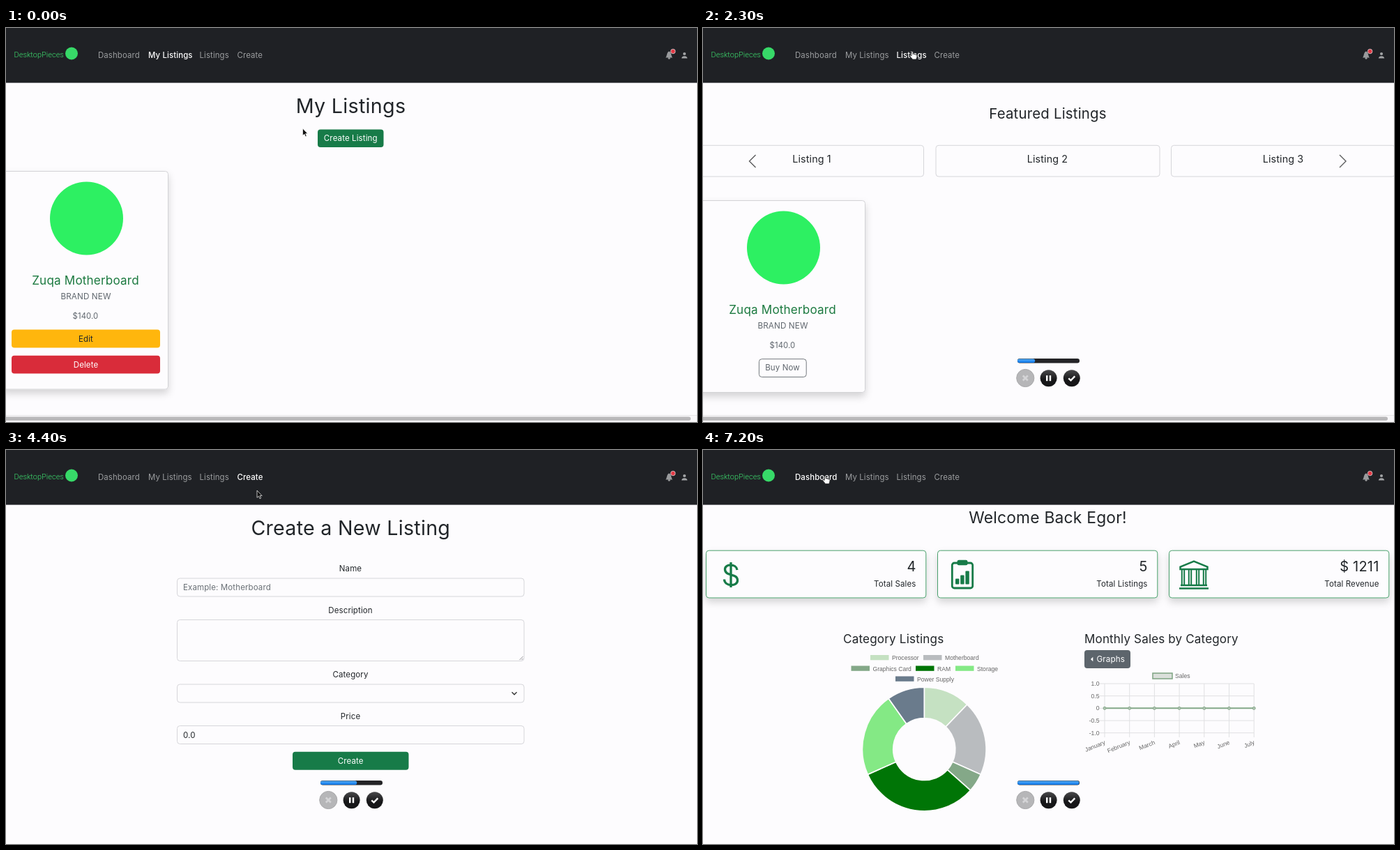
Write an HTML page that moves like this. It is 991 by 565 pixels and loops after 7300 ms.

```html
<!DOCTYPE html>
<html lang="en">
<head>
<meta charset="utf-8">
<title>Parts shop</title>
<style>
html, body { margin: 0; width: 100%; height: 100%; overflow: hidden; background: #fdfcfe; }
svg { display: block; width: 991px; height: 565px; }
text { font-family: Inter, sans-serif; font-optical-sizing: none; letter-spacing: .01em; fill: #212529; white-space: pre; }
text.chart { font-family: "Liberation Sans", sans-serif; letter-spacing: 0; fill: #666; }
text.brand { font-family: Roboto, sans-serif; font-weight: 300; letter-spacing: 0; }
</style>
</head>
<body>
<svg id="stage" viewBox="0 0 991 565" xmlns="http://www.w3.org/2000/svg"></svg>
<script>
const LOOP = 7300, STEP = 100;
const GREEN = '#177b48', INK = '#212529', GREY = '#5f666d', BG = '#fdfcfe';
const stage = document.getElementById('stage');
const el = id => document.getElementById(id);

const rect = (x, y, w, h, fill, extra = '') =>
  `<rect x="${x}" y="${y}" width="${w}" height="${h}" fill="${fill}" ${extra}/>`;
const circle = (x, y, r, fill, extra = '') =>
  `<circle cx="${x}" cy="${y}" r="${r}" fill="${fill}" ${extra}/>`;
const line = (d, color, width, extra = '') =>
  `<path d="${d}" fill="none" stroke="${color}" stroke-width="${width}" ${extra}/>`;
const text = (s, x, y, size, anchor = 'start', fill = INK, extra = '') =>
  `<text x="${x}" y="${y}" font-size="${size}" text-anchor="${anchor}" style="fill:${fill}" ${extra}>${s}</text>`;
const mid = (s, x, y, size, fill) => text(s, x, y, size, 'middle', fill);
const small = (s, x, y, anchor, extra = '') => text(s, x, y, 8.6, anchor, '#666', 'class="chart" ' + extra);
const group = (id, body) => `<g id="${id}">${body}</g>`;
const button = (s, x, y, w, h, fill, ink = '#fff') =>
  rect(x, y, w, h, fill, 'rx="4"') + mid(s, x + w / 2, y + h / 2 + 4, 11.5, ink);
const frame = (x, y, w, h, color = '#d6d6da', extra = '') =>
  rect(x, y, w, h, BG, `rx="4" stroke="${color}" ${extra}`);

// Navigation bar
const links = [['Dashboard', 132, 61], ['My Listings', 204, 62], ['Listings', 277.5, 43], ['Create', 331.5, 36]];
const nav = rect(0, 0, 991, 78.6, '#1f2125')
  + text('DesktopPieces', 11.5, 42, 11, 'start', '#3ee070', 'class="brand"')
  + circle(94, 36.5, 9, '#37d968')
  + links.map(([s, x], i) => text(s, x, 42.5, 11.4, 'start', '#9b9d9f', `id="link${i}"`)).join('')
  + '<path d="M946 42.5C948 41 947.5 34 951 33.5C954.5 34 954 41 956 42.5Z" fill="#999b9d"/>'
  + circle(951, 43.2, 1.5, '#999b9d')
  + circle(956.6, 33.5, 3.3, '#e33a45', 'stroke="#d9d9db" stroke-width=".8"')
  + circle(973, 37, 2.1, '#a2a4a6')
  + '<path d="M968.8 43.5C969 39 977 39 977.2 43.5Z" fill="#a2a4a6"/>';

// Product card shared by both listing pages
const card = (y, h, actions) =>
  frame(-5, y, 237.5, h, '#d3d3d6', 'filter="url(#shade)"')
  + circle(115.5, y + 67.5, 52.5, '#2df062')
  + mid('Zuqa Motherboard', 114, y + 162, 17.1, '#1c7a40')
  + mid('BRAND NEW', 114.5, y + 183.5, 11.7, GREY)
  + mid('$140.0', 114, y + 211, 11.3, GREY)
  + actions;

const mine = mid('My Listings', 494.5, 122, 28.7)
  + button('Create Listing', 447, 145.5, 94.5, 25.5, GREEN)
  + card(205.5, 312.5, button('Edit', 8, 432.5, 213, 26, '#ffb60d', INK)
    + button('Delete', 8, 469.8, 213, 25.7, '#d92c3a'));

const listings = mid('Featured Listings', 494.5, 130, 20.4)
  + [-4.5, 334, 671.5].map((x, i) => frame(x, 168.3, 321, 44.7)
    + mid('Listing ' + (i + 1), 156 + 338 * i, 193, 14.3)).join('')
  + line('M75.5 182L66.5 191L75.5 200M913 182L922 191L913 200', '#5b5b5d', 1.4)
  + card(247.5, 275, frame(80.4, 474.7, 67.8, 25.8, '#74797e') + mid('Buy Now', 114, 491, 11.5, GREY));

// Form page
const field = (label, y, h, value = '', color = INK) =>
  mid(label, 494, y - 10, 11.5) + frame(245.5, y, 497.5, h) + text(value, 254, y + 17, 11.5, 'start', color);
const form = mid('Create a New Listing', 494.3, 122, 28.6)
  + field('Name', 184, 26, 'Example: Motherboard', '#6a7076')
  + field('Description', 243.5, 59)
  + field('Category', 336, 26)
  + field('Price', 395.5, 26, '0.0')
  + line('M736.5 301L741.5 296M739.5 301L741.5 299', '#77777a', .8)
  + line('M725.5 347.2L729 350.7L732.5 347.2', '#333', 1.4)
  + button('Create', 411, 432.7, 166.5, 26, GREEN);

// Dashboard
const stats = [['4', 'Total Sales'], ['5', 'Total Listings'], ['$ 1211', 'Total Revenue']];
const tile = ([n, label], i) => {
  const x = 4.5 + 332 * i;
  return frame(x, 144.2, 315.3, 67.8, '#4aa06c', 'filter="url(#shade)"')
    + text(n, x + 301, 174, 20, 'end') + text(label, x + 301, 195.8, 11.5, 'end');
};
const icons = line('M49 172C48 163 31.5 162.5 31.5 171C31.5 182 49.5 176 49.5 187C49.5 196 31 196 30.5 185.5M40 161V197', GREEN, 3.3)
  + rect(357.3, 162, 29.4, 36, 'none', `rx="3" stroke="${GREEN}" stroke-width="2.8"`)
  + rect(364.5, 157.8, 15, 7.5, GREEN, 'rx="2.5"')
  + [8, 13, 19].map((h, i) => rect(362 + 7.2 * i, 192.5 - h, 5.4, h, GREEN, 'rx="1"')).join('')
  + line('M684.5 171V167.5L704 159.5L723.5 167.5V171Z', GREEN, 2.5)
  + [688.5, 698.5, 709.5, 719.5].map(x => line(`M${x - 1.7} 172V193M${x + 1.7} 172V193`, GREEN, 2)).join('')
  + line('M685 194H723M683 198.5H725', GREEN, 2.6);

// name, value, colour, legend position
const parts = [
  ['Processor', 5, '#c5e1c2', 240, 294],
  ['Motherboard', 8, '#b9bcbf', 316, 294],
  ['Graphics Card', 2, '#84a888', 212.5, 309.5],
  ['RAM', 13, '#007506', 305, 309.5],
  ['Storage', 9, '#84e985', 362, 309.5],
  ['Power Supply', 4, '#6a7b8c', 276, 324.5]
];
const total = parts.reduce((sum, p) => sum + p[1], 0);
const legend = parts.map(([s, , color, x, y]) =>
  rect(x, y, 26.5, 7.3, color) + small(s, x + 31, y + 7)).join('');

const months = ['January', 'February', 'March', 'April', 'May', 'June', 'July'];
const monthX = i => 576 + 35.7 * i;
const levelY = i => 335 + 17.67 * i;
const sales = rect(645, 320, 28, 8, '#dadfda', 'stroke="#84a888" stroke-width="1.6"')
  + small('Sales', 677, 327)
  + ['1.0', '0.5', '0', '-0.5', '-1.0'].map((s, i) =>
    line(`M568 ${levelY(i)}H790`, '#e0e0e2', 1) + small(s, 568.5, levelY(i) + 3, 'end')).join('')
  + months.map((s, i) => {
    const x = monthX(i);
    return line(`M${x} 335V412`, '#e0e0e2', 1)
      + small(s, x + 1.5, 421.5, 'end', `transform="rotate(-22 ${x + 1.5} 421.5)"`);
  }).join('')
  + line('M576 370.3H790', '#84a888', 2)
  + months.map((s, i) => circle(monthX(i), 370.3, 2, '#b4c6b6', 'stroke="#84a888"')).join('');

const dashboard = mid('Welcome Back Egor!', 494.5, 105, 22.8)
  + stats.map(tile).join('') + icons
  + text('Category Listings', 201, 277, 17.1)
  + text('Monthly Sales by Category', 547, 277, 17)
  + rect(547, 287, 66, 26, '#5d656c', 'rx="4"')
  + '<path d="M559.3 296.8V303.2L556 300Z" fill="#fff"/>'
  + text('Graphs', 564.5, 304, 11.7, 'start', '#fff')
  + legend + group('ring', '') + sales;

// Recorder controls, scroll bar and pointer
const controls = rect(451, 474, 89, 6.4, '#242427', 'rx="3.2"')
  + rect(451, 474.4, 0, 5.6, 'url(#blue)', 'id="bar" rx="2.8"')
  + circle(462.3, 502, 12.6, '#b6b6b8', 'stroke="#a9a9ab"')
  + line('M458.8 498.5L465.8 505.5M465.8 498.5L458.8 505.5', '#d4d4d6', 2.6)
  + circle(495.6, 502.2, 12, 'url(#dark)') + circle(528.8, 502.2, 12, 'url(#dark)')
  + rect(492, 498.2, 2.5, 8, '#fff') + rect(496.7, 498.2, 2.5, 8, '#fff')
  + line('M524.3 502.3L527.5 505.3L533.3 499.3', '#fff', 2.4);
const scroll = rect(0, 555, 991, 10, '#f8f7f9') + rect(0, 555, 991, 1, '#e7e6e8')
  + rect(-4, 557.6, 986, 5.4, '#b9b8ba', 'id="thumb" rx="2.7"');
const pointer = group('arrow', '<path d="M0 0V10.3L2.4 8.2L4 11.8L5.7 11L4.1 7.6H7.2Z" fill="#111" stroke="#fff" stroke-width=".7"/>')
  + group('hand', '<path d="M-.9 .8C-.7 -.4 1 -.4 1.2 .8V4C2.4 3.5 3 3.8 3.3 4.4C4.4 4 5 4.4 5.2 5C6.5 4.7 7 5.3 7 6.3C7 9 6.2 9.6 5.8 11.5H.5C-.5 9.5 -2.5 8 -3.5 6.4C-3.4 5.2 -2 5.2 -.9 6.5Z" fill="#fff" stroke="#222" stroke-width=".8"/>');

stage.innerHTML = `<defs>
  <filter id="shade" x="-10%" y="-30%" width="120%" height="170%">
    <feDropShadow dx="0" dy="5.7" stdDeviation="5.2" flood-color="#000" flood-opacity=".16"/></filter>
  <linearGradient id="blue" x2="0" y2="1"><stop stop-color="#58b0fa"/><stop offset="1" stop-color="#0a72e4"/></linearGradient>
  <linearGradient id="dark" x2="0" y2="1"><stop stop-color="#4a4a4c"/><stop offset=".6" stop-color="#161618"/></linearGradient>
  </defs>` + rect(0, 0, 991, 565, BG) + nav
  + group('page0', dashboard) + group('page1', mine) + group('page2', listings) + group('page3', form)
  + group('scroll', scroll) + group('controls', controls) + group('pointer', pointer);

// start time, page index
const visits = [[0, 1], [1200, 2], [3100, 1], [3900, 3], [6300, 0]];
// time, x, y of the pointer tip
const path = [
  [0, 425.5, 144], [300, 425.5, 144], [1000, 304, 37], [1400, 300, 33], [2400, 300, 33.5],
  [3000, 243.5, 38], [3200, 243.5, 38], [3600, 353.5, 41], [3900, 353.5, 41], [4400, 360, 58],
  [4800, 345, 59], [5400, 260, 45], [6000, 175, 37], [7300, 175, 37]
];

function pointerAt(t) {
  const i = Math.max(1, path.findIndex(p => p[0] > t));
  const [t0, x0, y0] = path[i - 1], [t1, x1, y1] = path[i];
  const u = (t - t0) / (t1 - t0), e = u * u * (3 - 2 * u);
  return [x0 + (x1 - x0) * e, y0 + (y1 - y0) * e];
}

function ringAt(p) {
  const at = (r, a) => `${(317.3 + r * Math.sin(a)).toFixed(2)} ${(429 - r * Math.cos(a)).toFixed(2)}`;
  let a = 0;
  return parts.map(([, value, color]) => {
    const b = a + value / total * 2 * Math.PI * p;
    const d = `M${at(88.8, a)}A88.8 88.8 0 0 1 ${at(88.8, b)}L${at(44.5, b)}A44.5 44.5 0 0 0 ${at(44.5, a)}Z`;
    a = b;
    return `<path d="${d}" fill="${color}" stroke="${BG}" stroke-width="1.7"/>`;
  }).join('');
}

const show = (id, on) => el(id).setAttribute('display', on ? 'inline' : 'none');

function draw(t) {
  const page = visits.filter(v => v[0] <= t).pop()[1];
  const [x, y] = pointerAt(t);
  const over = links.findIndex(([, left, w]) => y > 26 && y < 50 && x >= left && x <= left + w);
  links.forEach((link, i) => {
    const node = el('link' + i);
    node.style.fill = i === page ? '#fff' : i === over ? '#c3c4c6' : '#9b9d9f';
    node.style.fontWeight = i === page ? 500 : 400;
    show('page' + i, i === page);
  });
  show('scroll', page === 1 || page === 2);
  show('thumb', t < 2900 || t >= 3100);
  show('controls', t >= 100);
  el('bar').setAttribute('width', Math.min(88.5, Math.max(0, (t - 350) * .0129)));
  el('pointer').setAttribute('transform', `translate(${x.toFixed(2)} ${y.toFixed(2)})`);
  show('hand', over >= 0);
  show('arrow', over < 0);
  const u = Math.min(1, Math.max(0, (t - 6227) / 1000));
  el('ring').innerHTML = page === 0 ? ringAt(1 - (1 - u) ** 4) : '';
}

const begin = performance.now();
function tick() {
  const t = (performance.now() - begin) % LOOP;
  draw(Math.floor(t / STEP) * STEP);
  requestAnimationFrame(tick);
}
tick();
</script>
</body>
</html>
```
